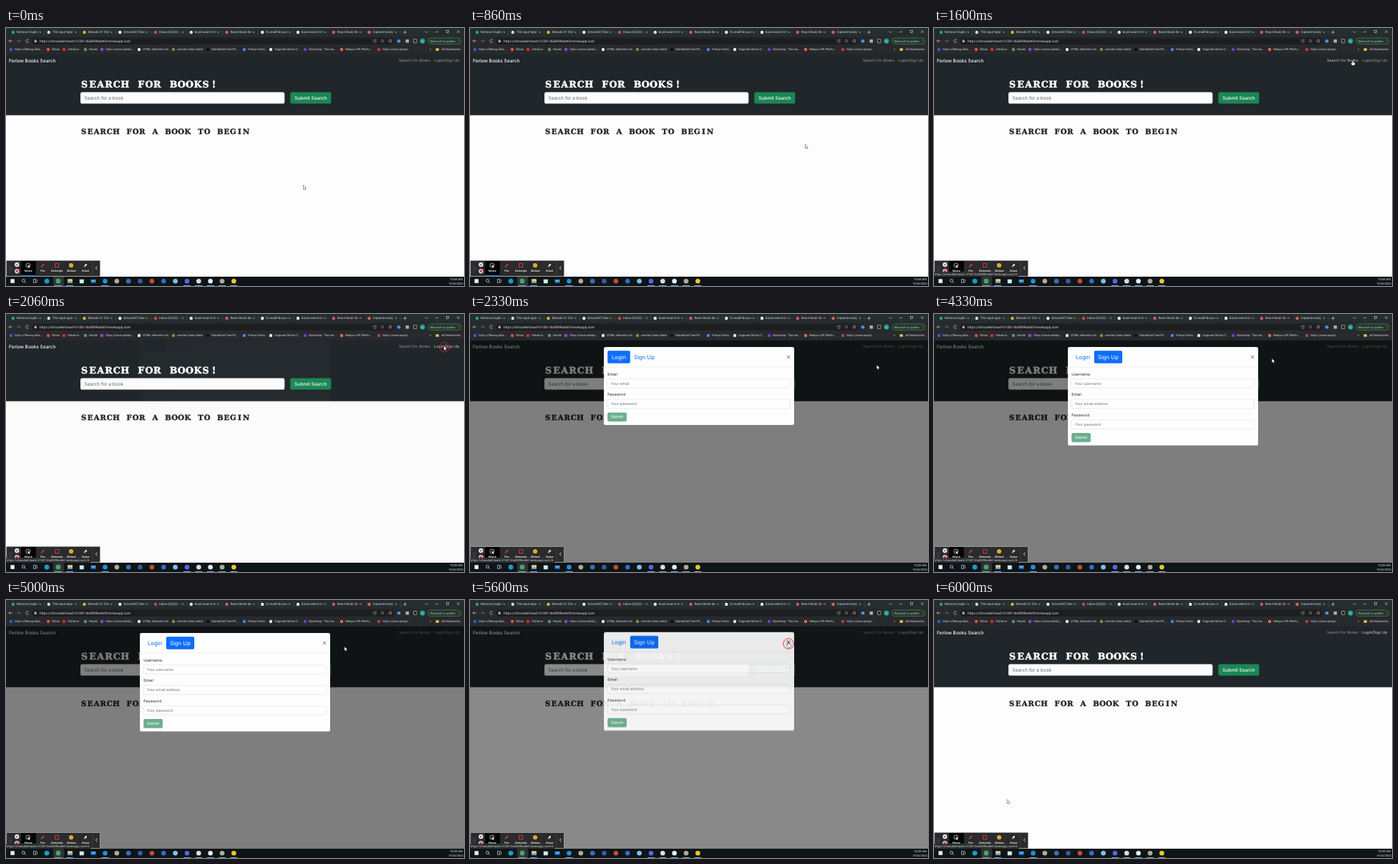
An HTML page with a canvas that plays this animation: 640 by 360 pixels, repeating every 6060 ms.

```html
<!DOCTYPE html>
<html lang="en">
<head>
<meta charset="utf-8">
<title>Book search walkthrough</title>
<style>
html, body { margin: 0; width: 100%; height: 100%; overflow: hidden; background: #212529; }
canvas { display: block; width: 640px; height: 360px; }
</style>
</head>
<body>
<canvas id="stage" width="640" height="360"></canvas>
<script>
const LOOP = 6060, STEP = LOOP / 91;
const UI = 'Roboto, "Open Sans", sans-serif';
const PAGE = 'Inter, Roboto, sans-serif';
const SLAB = '"DejaVu Serif", "Noto Serif", serif';
const HOST = 'https://shrouded-beach-51381-8a3809bede0.herokuapp.com';
const OPEN = 1995, SWITCH = 3178, CLOSE = 5582;

const stage = document.getElementById('stage').getContext('2d');
const layer = document.createElement('canvas');
layer.width = 640;
layer.height = 360;
const modalCtx = layer.getContext('2d');
let c = stage;

const clamp = v => Math.max(0, Math.min(1, v));
const fade = (t, from, ms) => clamp((t - from) / ms);
const easeOut = p => 1 - (1 - p) ** 2;
const smooth = p => p * p * (3 - 2 * p);

function rect(x, y, w, h, fill) {
  c.fillStyle = fill;
  c.fillRect(x, y, w, h);
}

function round(x, y, w, h, r, fill, stroke, lw = 0.5) {
  c.beginPath();
  c.roundRect(x, y, w, h, r);
  if (fill) { c.fillStyle = fill; c.fill(); }
  if (stroke) { c.strokeStyle = stroke; c.lineWidth = lw; c.stroke(); }
}

function dot(x, y, r, fill) {
  c.fillStyle = fill;
  c.beginPath();
  c.arc(x, y, r, 0, 7);
  c.fill();
}

function ring(x, y, r, color, lw) {
  c.strokeStyle = color;
  c.lineWidth = lw;
  c.beginPath();
  c.arc(x, y, r, 0, 7);
  c.stroke();
}

function line(color, lw, ...p) {
  c.strokeStyle = color;
  c.lineWidth = lw;
  c.beginPath();
  for (let i = 0; i < p.length; i += 2) c.lineTo(p[i], p[i + 1]);
  c.stroke();
}

function cross(x, y, r, color, lw) {
  line(color, lw, x - r, y - r, x + r, y + r);
  line(color, lw, x + r, y - r, x - r, y + r);
}

// y is the middle of the lowercase letters
function text(s, x, y, size, color, family = UI, align = 'left', weight = 400) {
  c.font = `${weight} ${size}px ${family}`;
  c.textRendering = 'geometricPrecision';
  c.textAlign = align;
  c.textBaseline = 'alphabetic';
  c.fillStyle = color;
  c.fillText(s, x, y + size * 0.33);
}

// Heavy slab letters, each centred in an equal cell
function slab(s, x, base, size, cell, color) {
  c.font = `700 ${size}px ${SLAB}`;
  c.textAlign = 'center';
  c.textBaseline = 'alphabetic';
  c.fillStyle = c.strokeStyle = color;
  c.lineWidth = size * 0.04;
  [...s].forEach((ch, i) => {
    const cx = x + (i + 0.5) * cell;
    c.fillText(ch, cx, base);
    c.strokeText(ch, cx, base);
  });
}

function browser() {
  rect(0, 0, 640, 12, '#252e2e');
  rect(0, 11, 640, 26, '#27292c');
  const tabs = [
    ['Remove Duplic', '#2fa37f'], ['The input type', '#d8d8d8'], ['Module 21 Cha', '#e0b13c'],
    ['Qmarsh47/Book', '#eeeeee'], ['Inbox (8,223) -', '#d9473b'], ['book-search-m', '#eeeeee'],
    ['React Book Sea', '#d85a5a'], ['fs.readFile javas', '#eeeeee'], ['book-search-m', '#eeeeee'],
    ['React Book Sea', '#d85a5a'], ['Capturemosty', '#e5605a']
  ];
  round(451, 0.5, 50, 13, 2.5, '#27292c');
  tabs.forEach(([label, color], i) => {
    const x = 10 + i * 49.75;
    dot(x, 6, 2.2, color);
    c.save();
    c.beginPath();
    c.rect(x, 0, 34.5, 12);
    c.clip();
    text(label, x + 5, 6, 4.5, '#d5d7da');
    c.restore();
    cross(x + 37.7, 5.8, 1.2, '#c5c7ca', 0.55);
    if (i < 8 || i > 9) rect(x + 43.5, 3, 0.5, 6, '#4a4f50');
  });
  line('#ccc', 0.7, 555, 6, 560, 6);
  line('#ccc', 0.7, 557.5, 3.5, 557.5, 8.5);
  line('#ccc', 0.7, 585.5, 4.5, 587.5, 6.5, 589.5, 4.5);
  line('#ddd', 0.6, 600, 5.5, 604, 5.5);
  c.strokeRect(615.5, 3.5, 3, 3);
  cross(632, 5.2, 1.8, '#ddd', 0.6);

  // address row
  line('#ccc', 0.7, 9, 18, 4, 18);
  line('#ccc', 0.7, 6, 16, 4, 18, 6, 20);
  line('#77797c', 0.7, 15, 18, 20, 18);
  line('#77797c', 0.7, 18, 16, 20, 18, 18, 20);
  c.strokeStyle = '#ccc';
  c.beginPath();
  c.arc(30, 18, 2.1, 0.5, 5.8);
  c.stroke();
  round(36, 13.5, 507, 9.5, 4.7, '#1d1e20');
  round(39.7, 17.3, 3, 2.7, 0.4, '#bbb');
  ring(41.2, 17.2, 1, '#bbb', 0.5);
  text(HOST, 47, 18.3, 4.7, '#dfe1e4');
  round(513.5, 16.5, 3.5, 3.5, 0.3, null, '#bbb');
  line('#bbb', 0.5, 515.5, 18, 518, 15.5);
  ring(526, 18, 1.8, '#bbb', 0.5);
  c.strokeStyle = '#ccc';
  c.beginPath();
  for (let i = 0; i < 10; i++) {
    const a = i * Math.PI / 5 - Math.PI / 2, r = i % 2 ? 1.1 : 2.4;
    c.lineTo(537 + r * Math.cos(a), 18 + r * Math.sin(a));
  }
  c.closePath();
  c.stroke();
  dot(549, 18.3, 2.3, '#4a9be8');
  round(558.5, 16, 4.5, 4.5, 0.6, '#aeb1b4');
  round(569.5, 15.5, 4.5, 5, 0.5, null, '#ccc', 0.6);
  dot(582, 18.2, 3.6, '#17998d');
  text('Q', 582, 18.3, 4, '#fff', UI, 'center');
  round(589.5, 13.8, 46.5, 8.7, 4.3, '#26352d', '#5e9f79');
  text('Relaunch to update', 592.5, 18.2, 4.1, '#9bd6ae');
  [16.5, 18.2, 19.9].forEach(y => dot(633, y, 0.4, '#9bd6ae'));

  // bookmarks
  [
    [7, 'https://lifeway.okta...', '#2766d8'], [59, 'Mivox', '#e55041'],
    [81, 'Viewlum', '#e32a25'], [111, 'Roads', '#48a85a'],
    [134, 'https://www.udemy...', '#8b48d8'], [186, 'HTML elements ref...', '#e8e8e8'],
    [234, 'emmet cheat sheet', '#6a9e42'], [282, 'Wonderful Free Ph...', '#111111'],
    [333, 'Ferlow Fonts', '#4687ea'], [370, 'Tagnook Online C...', '#eeeeee'],
    [418, 'Bootstrap · The mo...', '#7b35dd'], [469, 'Relayor API Platfo...', '#ee6c3b'],
    [521, 'https://www.npmjs...', '#c83d3d']
  ].forEach(([x, label, color]) => {
    dot(x, 30, 2.2, color);
    text(label, x + 5.3, 30.1, 4.15, '#d8dadd');
  });
  text('»', 592, 29.8, 5, '#ddd');
  round(600.5, 28.3, 4.5, 3.5, 0.4, '#e8c04f');
  text('All Bookmarks', 608.5, 30.1, 4.15, '#d8dadd');
}

function page(t) {
  rect(0, 121, 640, 226, '#fdfdfd');
  rect(0, 36.7, 640, 85, '#202629');
  text('Ferlow Books Search', 4, 45.7, 6.5, '#fff', PAGE, 'left', 500);
  const overBooks = t > 1540 && t < 1700;
  const overLogin = t > 1740 && t < 2120 || t > CLOSE;
  text('Search For Books', 549, 45.5, 5.25, overBooks ? '#c9cacb' : '#9b9d9f', PAGE);
  text('Login/Sign Up', 598, 45.5, 5.3, overLogin ? '#dcddde' : '#9b9d9f', PAGE);
  slab('SEARCH FOR BOOKS!', 104, 82.9, 12.6, 11.3, '#fff');
  round(104, 89.6, 285.3, 16, 2.6, '#fdfdfd');
  text('Search for a book', 109.5, 97.8, 6.5, '#5f666c', PAGE);
  round(397.2, 89.6, 57.2, 16, 2.6, '#198754');
  text('Submit Search', 425.7, 97.8, 6.5, '#fff', PAGE, 'center', 500);
  slab('SEARCH FOR A BOOK TO BEGIN', 104, 147.5, 10.1, 9.08, '#212529');
}

function pill(label, x, w, on) {
  c.save();
  c.globalAlpha *= on;
  round(x, 51.2, w, 17.6, 2, '#0d6efd');
  c.restore();
  const mix = (a, b) => Math.round(a + (b - a) * on);
  text(label, x + w / 2, 60.1, 7.75, `rgb(${mix(13, 255)},${mix(110, 255)},${mix(253, 255)})`, PAGE, 'center');
}

function form(fields) {
  fields.forEach(([label, hint], i) => {
    const y = 84 + i * 28.6;
    text(label, 192.2, y, 5.35, '#212529', PAGE);
    round(192.3, y + 6.7, 255, 12.4, 2, '#fefefe', '#d9dde1', 0.55);
    text(hint, 197, y + 12.9, 5.1, '#686f75', PAGE);
  });
  const y = 80.3 + fields.length * 28.6;
  round(192.2, y, 26.7, 12.6, 2, '#6aaf90');
  text('Submit', 205.5, y + 6.3, 5.15, '#fff', PAGE, 'center', 500);
}

function modal(t) {
  c = modalCtx;
  c.clearRect(0, 0, 640, 360);
  const signing = t >= SWITCH;
  const on = fade(t, SWITCH, 150);
  round(187, 46, 266, signing ? 137.6 : 109, 2.7, '#fdfdfd', 'rgba(0,0,0,.18)', 0.4);
  pill('Login', 192.2, 31.6, 1 - on);
  pill('Sign Up', 223.8, 39.3, on);
  const hot = t > 5400;
  cross(445, 60, 2.3, hot ? '#222' : '#747474', 0.9);
  rect(187, 73.7, 266, 0.5, '#dee2e6');
  c.save();
  c.globalAlpha = signing ? on : 1;
  form(signing
    ? [['Username', 'Your username'], ['Email', 'Your email address'], ['Password', 'Your password']]
    : [['Email', 'Your email'], ['Password', 'Your password']]);
  c.restore();
  c = stage;
}

function overlay(t) {
  if (t < OPEN || t > CLOSE + 300) return;
  const closing = t >= CLOSE;
  const alpha = closing ? 1 - fade(t, CLOSE, 150) : fade(t, OPEN, 150);
  const slide = closing ? easeOut(fade(t, CLOSE, 300)) : 1 - easeOut(fade(t, OPEN, 300));
  c.save();
  c.beginPath();
  c.rect(0, 36.7, 640, 310.3);
  c.clip();
  rect(0, 36.7, 640, 310.3, `rgba(0,0,0,${0.5 * alpha})`);
  modal(t);
  c.globalAlpha = alpha;
  c.drawImage(layer, 0, -16.7 * slide);
  c.restore();
}

function toolbar() {
  round(0.6, 324.5, 130.9, 22, 1, '#2a2b2c', '#a9abac', 0.8);
  for (let i = 0; i < 6; i++) dot(5 + i % 2 * 2, 333 + (i >> 1) * 2.2, 0.45, '#aaa');
  dot(15.3, 330.2, 3.1, '#f2f2f2');
  rect(14.3, 328.8, 0.7, 2.8, '#333');
  rect(15.7, 328.8, 0.7, 2.8, '#333');
  dot(15.3, 339.3, 3.1, '#f2f2f2');
  dot(15.3, 339.3, 2, '#e0483e');
  rect(21, 325.2, 20.7, 20.8, '#050505');
  rect(21, 345.2, 20.7, 1.3, '#3d8fe0');
  ring(30.8, 331.2, 3, '#eee', 0.7);
  arrow(30.8, 330.2, 0.8);
  line('#ef4040', 1.5, 49, 333.5, 53.5, 329);
  c.strokeStyle = '#ef3434';
  c.lineWidth = 0.9;
  c.strokeRect(68.5, 328.8, 5.3, 5);
  dot(91, 331.2, 3, '#f5b83d');
  dot(90, 330.5, 0.45, '#333');
  dot(92, 330.5, 0.45, '#333');
  line('#8a4c16', 0.5, 89.6, 332.3, 91, 333, 92.4, 332.3);
  line('#e8a0a8', 2, 109.3, 333, 112.6, 329.8);
  line('#eee', 2, 111, 331.3, 112.6, 329.8);
  ['Mouse', 'Pen', 'Rectangle', 'Stickers', 'Eraser'].forEach((s, i) =>
    text(s, 31.3 + i * 20, 339.3, 3.6, '#eee', UI, 'center', 700));
  rect(120.8, 325, 0.5, 21, '#555');
  line('#eee', 0.9, 127.5, 332.8, 125.3, 335, 127.5, 337.2);
}

function taskbar() {
  rect(0, 347, 640, 13, '#0d1518');
  rect(66, 347, 15, 13, '#2b3437');
  rect(6.3, 350.3, 5.6, 5.6, '#e4ecef');
  ring(24.4, 352.5, 2, '#eee', 0.7);
  line('#eee', 0.7, 25.9, 354, 27.7, 355.8);
  c.strokeStyle = '#ddd';
  c.strokeRect(38.5, 350.7, 3, 4.5);
  line('#ddd', 0.7, 43.3, 350.5, 43.3, 355.5);
  dot(57, 353.2, 3.4, '#2297c4');
  dot(73, 353.2, 3.4, '#4aa362');
  round(86, 350.3, 7, 5.8, 0.6, '#f0ca59');
  rect(86, 353.7, 7, 2.4, '#4fa0da');
  round(102.8, 350.8, 6, 5.4, 0.5, '#d9e5e8');
  round(118.7, 351, 6.8, 4.6, 0.4, '#2b8edb');
  line('#d6effc', 0.5, 118.9, 351.2, 122, 353.7, 125.3, 351.2);
  [
    '#2591d8', '#b5a98f', '#3574b3', '#3e56a8', '#c8482f', '#2f6fd0',
    '#7fc4e0', '#5965e9', '#e9dada', '#e5eee8', '#b5a98f', '#f3c623'
  ].forEach((color, i) => dot(138.5 + i * 16.35, 353.2, 3.3, color));
  [73, 89, 138.5, 253, 269.3, 285.7, 302, 318.3].forEach(x => rect(x - 5, 359, 10, 1, '#6db1dd'));
  text('10:38 AM', 629, 350.6, 4.1, '#eee', UI, 'center');
  text('9/24/2023', 629, 356.5, 4.1, '#eee', UI, 'center');
}

function shape(points, x, y, k) {
  c.save();
  c.translate(x, y);
  c.scale(k, k);
  c.beginPath();
  points.forEach(p => c.lineTo(...p));
  c.closePath();
  c.lineJoin = 'round';
  c.strokeStyle = '#222';
  c.lineWidth = 0.9;
  c.stroke();
  c.fillStyle = '#fff';
  c.fill();
  c.restore();
}

function arrow(x, y, k = 1) {
  shape([[0, 0], [0, 5], [1.2, 4], [2, 5.9], [2.9, 5.5], [2.1, 3.7], [3.7, 3.6]], x, y, k);
}

function hand(x, y) {
  shape([[-0.6, 0], [0.5, 0], [0.6, 2.3], [3, 2.9], [3.1, 4.7], [2.3, 6.5],
    [-0.7, 6.5], [-2.4, 4], [-1.8, 3.4], [-0.6, 4.2]], x, y, 1);
}

// time, x, y
const path = [
  [0, 415.5, 219.7], [200, 416.5, 217], [460, 416.5, 217], [1300, 562, 64], [1600, 585, 45.5],
  [1850, 612, 45], [2090, 612, 45], [2330, 568.5, 71.5], [3060, 258, 62.5], [3300, 258, 62.5],
  [4330, 472.3, 62.5], [4900, 476, 66], [5400, 445, 59.5], [5640, 445, 59.5], [6000, 102, 279], [LOOP, 96, 290]
];

function pointer(t) {
  const i = Math.max(1, path.findIndex(p => p[0] > t));
  const [t0, x0, y0] = path[i - 1], [t1, x1, y1] = path[i];
  const p = smooth((t - t0) / (t1 - t0));
  const x = x0 + (x1 - x0) * p, y = y0 + (y1 - y0) * p;

  [[1930, 613, 46], [3110, 259, 63], [5510, 445, 61]].forEach(([at, cx, cy]) => {
    const age = (t - at) / 210;
    if (age < 0 || age > 1) return;
    const r = 5 + 6 * age;
    dot(cx, cy, r, 'rgba(200,60,60,.08)');
    ring(cx, cy, r, `rgba(205,35,40,${0.95 - 0.4 * age})`, 1);
  });

  const within = (l, r, top, bottom) => x > l && x < r && y > top && y < bottom;
  const open = t > OPEN && t < CLOSE;
  const link = open
    ? within(192, 263, 51, 69) || within(441, 449, 56, 64)
    : within(549, 635, 41, 50) || t >= CLOSE && within(441, 449, 56, 64);
  (link ? hand : arrow)(x, y);
}

function status(t) {
  if (t < 1540) return;
  round(-1, 340.3, 119, 6.7, [0, 1.5, 0, 0], '#292a2d', '#4c4d50', 0.4);
  text(HOST + '/#', 1, 343.6, 4.1, '#d3d5d8');
}

function draw(t) {
  c = stage;
  c.clearRect(0, 0, 640, 360);
  browser();
  page(t);
  overlay(t);
  toolbar();
  status(t);
  taskbar();
  pointer(t);
}

let start;
function tick(now) {
  start ??= now;
  const t = (now - start) % LOOP;
  draw(Math.min(90, Math.floor((t + 4) / STEP)) * STEP);
  requestAnimationFrame(tick);
}
draw(0);
requestAnimationFrame(tick);
</script>
</body>
</html>
```
